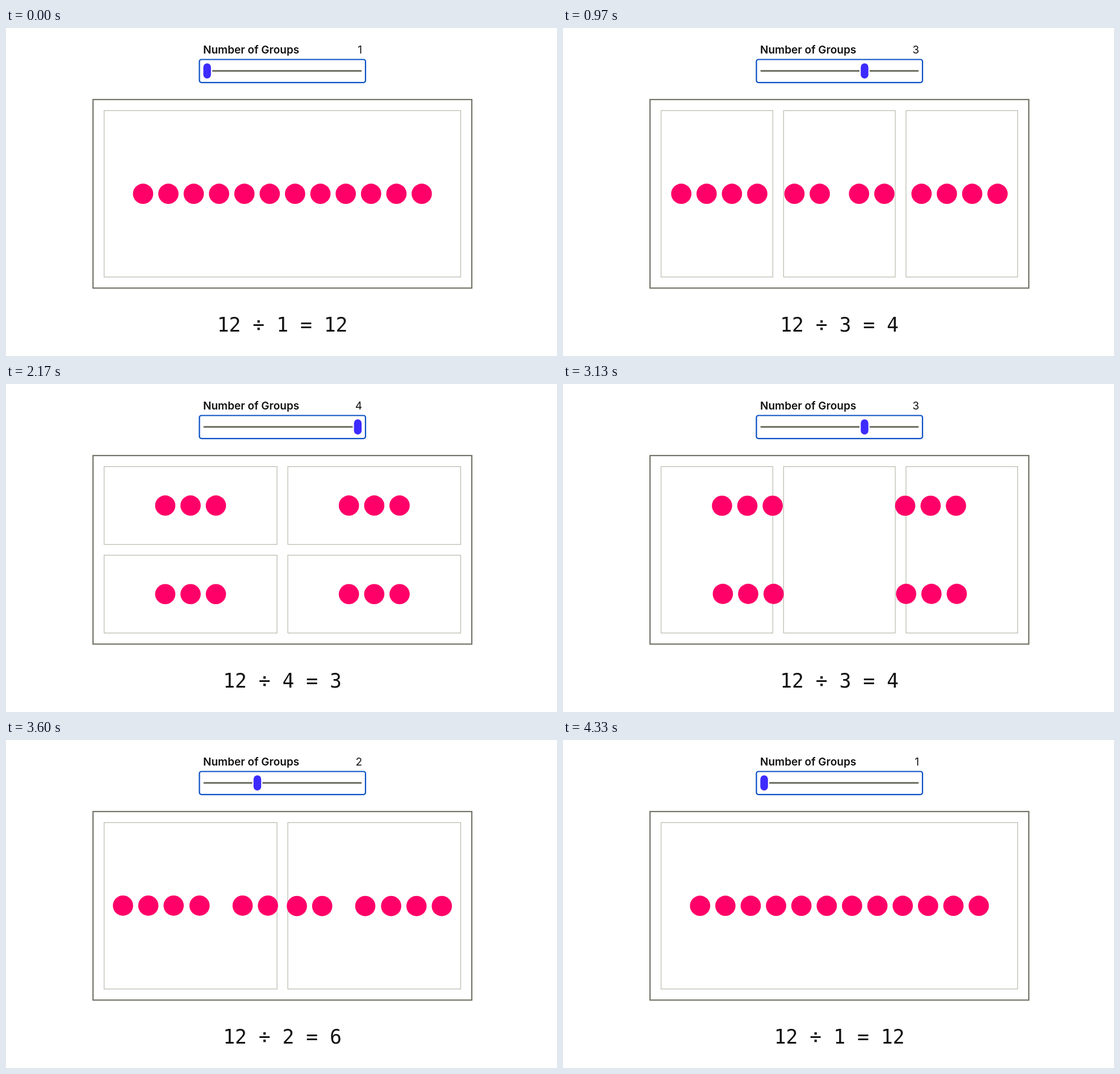
These frames come from a looping animation (970 px wide and 578 px high, 4.63 s). An HTML page with a canvas:

```html
<!DOCTYPE html>
<html lang="en">
<head>
<meta charset="utf-8">
<title>Number of Groups</title>
<style>
  html, body { margin: 0; width: 970px; height: 578px; overflow: hidden; background: #fff; }
  canvas, svg { position: absolute; left: 0; top: 0; width: 970px; height: 578px; }
  text { fill: #111; white-space: pre; }
  .label { font: 600 19px Inter, sans-serif; }
  .value { font: 400 19px Inter, sans-serif; text-anchor: end; }
  .sum { font: 34.7px "DejaVu Sans Mono", monospace; text-anchor: middle; }
</style>
</head>
<body>
<canvas id="stage"></canvas>
<svg viewBox="0 0 970 578">
  <text class="label" x="347" y="45">Number of Groups</text>
  <text class="value" id="value" x="627" y="45">1</text>
  <text class="sum" id="sum" x="486.6" y="534.8">12 ÷ 1 = 12</text>
</svg>
<script>
const LOOP = 4630, FRAME = 100 / 3, MOVE = 450, DOTS = 12;
const SCALE = 1.115, CX = 486.6, CY = 292.2;
const GAP = 16, INNER_W = 564, INNER_H = 264;

// Each slider move: start time and new group count
const STEPS = [
  { at: -MOVE, n: 1 },
  { at: 12, n: 2 },
  { at: 816, n: 3 },
  { at: 1701, n: 4 },
  { at: 3113, n: 3 },
  { at: 3511, n: 2 },
  { at: 3875, n: 1 }
];

const canvas = document.getElementById('stage');
const ctx = canvas.getContext('2d');
const value = document.getElementById('value');
const sum = document.getElementById('sum');
const dpr = window.devicePixelRatio || 1;
canvas.width = 970 * dpr;
canvas.height = 578 * dpr;

const bezier = (a, b, s) => 3 * a * s * (1 - s) ** 2 + 3 * b * s * s * (1 - s) + s ** 3;

// cubic-bezier(.4, 0, .1, 1)
function ease(x) {
  if (x <= 0) return 0;
  if (x >= 1) return 1;
  let lo = 0, hi = 1;
  for (let i = 0; i < 30; i++) {
    const mid = (lo + hi) / 2;
    if (bezier(0.4, 0.1, mid) < x) lo = mid; else hi = mid;
  }
  return bezier(0, 1, lo);
}

// Group boxes, relative to the centre of the frame
function boxes(n) {
  const cols = n === 4 ? 2 : n, rows = n / cols;
  const w = (INNER_W - GAP * (cols - 1)) / cols;
  const h = (INNER_H - GAP * (rows - 1)) / rows;
  return Array.from({ length: n }, (_, i) => ({
    x: -INNER_W / 2 + (i % cols) * (w + GAP),
    y: -INNER_H / 2 + Math.floor(i / cols) * (h + GAP),
    w, h
  }));
}

function layout(n) {
  const per = DOTS / n, groups = boxes(n);
  return Array.from({ length: DOTS }, (_, i) => {
    const b = groups[Math.floor(i / per)];
    return [b.x + b.w / 2 + (i % per - (per - 1) / 2) * 40, b.y + b.h / 2];
  });
}

// A new move begins wherever the dots are when it interrupts the last one
function dotsAt(t) {
  let dots = layout(1);
  STEPS.forEach((step, k) => {
    if (step.at > t) return;
    const end = k + 1 < STEPS.length ? Math.min(t, STEPS[k + 1].at) : t;
    const p = ease((end - step.at) / MOVE);
    const goal = layout(step.n);
    dots = dots.map(([x, y], i) => [x + (goal[i][0] - x) * p, y + (goal[i][1] - y) * p]);
  });
  return dots;
}

function pill(x, y, w, h, r, color) {
  ctx.fillStyle = color;
  ctx.beginPath();
  ctx.roundRect(x, y, w, h, r);
  ctx.fill();
}

function border(x, y, w, h, line, color) {
  ctx.strokeStyle = color;
  ctx.lineWidth = line;
  ctx.strokeRect(x + line / 2, y + line / 2, w - line, h - line);
}

function drawSlider(n) {
  const x = 354.1 + (n - 1) * 88.4;
  ctx.strokeStyle = '#0b50c4';
  ctx.lineWidth = 2.23;
  ctx.beginPath();
  ctx.roundRect(340.5, 55.5, 292.4, 40.6, 3.5);
  ctx.stroke();
  pill(347.4, 73.9, 279, 3.4, 1.7, '#757569');
  pill(x - 8.9, 60, 17.8, 31.2, 8.9, '#fff');
  pill(x - 6.7, 62.2, 13.4, 26.8, 6.7, '#3d2bff');
}

function draw(t) {
  const { n } = STEPS.filter(s => s.at <= t).pop();
  ctx.setTransform(dpr, 0, 0, dpr, 0, 0);
  ctx.fillStyle = '#fff';
  ctx.fillRect(0, 0, 970, 578);
  drawSlider(n);

  ctx.translate(CX, CY);
  ctx.scale(SCALE, SCALE);
  border(-300, -150, 600, 300, 2, '#757569');
  boxes(n).forEach(b => border(b.x, b.y, b.w, b.h, 1, '#b3b4a4'));
  ctx.fillStyle = '#ff0069';
  dotsAt(t).forEach(([x, y]) => {
    ctx.beginPath();
    ctx.arc(x, y, 16, 0, Math.PI * 2);
    ctx.fill();
  });

  value.textContent = n;
  sum.textContent = `12 ÷ ${n} = ${DOTS / n}`;
}

const start = performance.now();
function tick() {
  const t = Math.max(0, performance.now() - start) % LOOP;
  draw(Math.floor((t + 3.4) / FRAME) * FRAME);
  requestAnimationFrame(tick);
}
tick();
</script>
</body>
</html>
```
